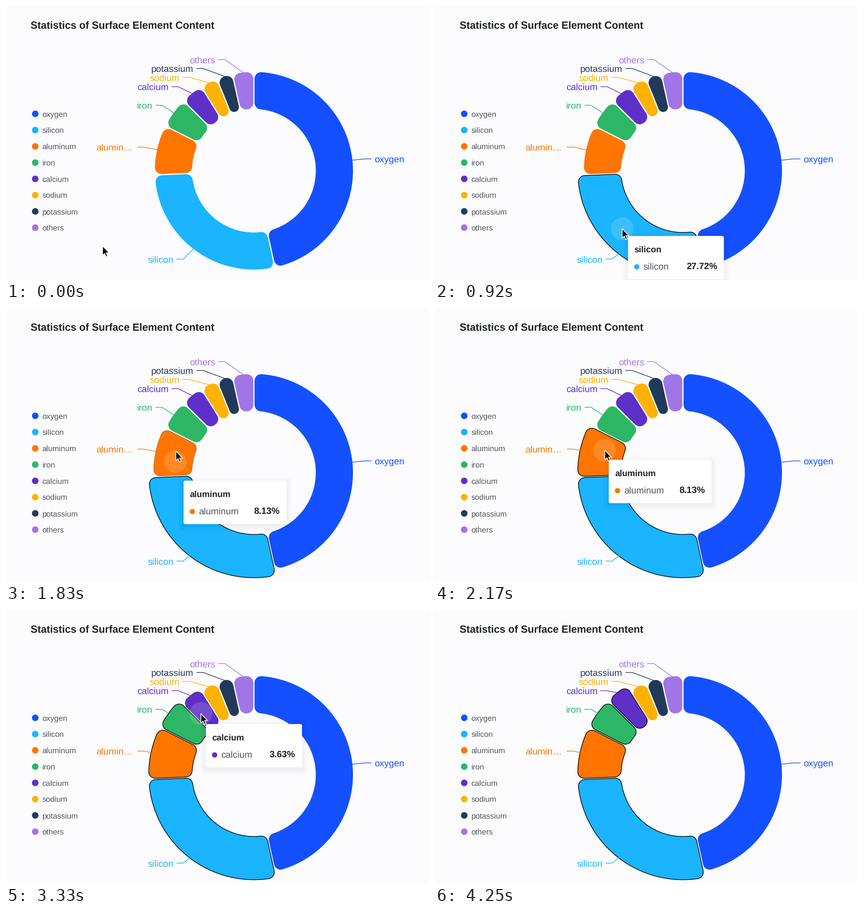
Recreate the animation shown at these times as a matplotlib script. Size 929x603 px, loop 4760 ms.

```python
import matplotlib.pyplot as plt
import numpy as np
from matplotlib.animation import FuncAnimation
from matplotlib.patches import Circle, FancyBboxPatch, Polygon

W, H, DPI = 929, 603, 64
LOOP, TICK = 4760, 20
CX, CY = 544.5, 362.5
R_IN, R_OUT, R_HOVER = 135.9, 217.5, 231.1
CORNER, PAD = 14.5, 1.34
GROW_STEPS = 3.6
BG, INK, GREY = "#fcfcfe", "#1d2129", "#50555f"

# name, share, colour, label text, text x, elbow x, line end x, line y
ITEMS = [
    ("oxygen", 46.60, "#1450ff", "oxygen", 809, 788, 802, 336.5),
    ("silicon", 27.72, "#1bb4ff", "silicon", 368, 389, 375, 557),
    ("aluminum", 8.13, "#ff7500", "alumin…", 279, 304, 290, 310.5),
    ("iron", 5.00, "#2db765", "iron", 322, 343, 329, 218.5),
    ("calcium", 3.63, "#5e30c8", "calcium", 357, 378, 364, 177.5),
    ("sodium", 2.83, "#ffb200", "sodium", 381, 402, 388, 157),
    ("potassium", 2.59, "#213a5a", "potassium", 412, 433, 419, 137.5),
    ("others", 3.50, "#a076e6", "others", 460, 481, 467, 118),
]

# slice index: (step when hover begins, tooltip width, value)
HOVERS = {
    1: (6.9, 210.5, "27.72%"),
    2: (21.2, 226, "8.13%"),
    3: (29.2, 148.5, "5%"),
    4: (38.55, 211, "3.63%"),
}
TIP_END = 45

# step, x, y
POINTER = np.array([
    (4, 212, 528), (5, 262, 520), (6, 370, 500), (7, 408, 491), (8, 411, 490),
    (13, 411, 490), (14, 409, 490), (17, 409, 490), (18, 389, 413),
    (19, 378, 400), (20, 372, 384), (21, 371, 348), (22, 373, 315),
    (23, 371, 314), (26, 373, 313), (28.5, 393, 288), (30, 400, 272),
    (31, 401, 271), (35, 401, 271), (36, 406, 263), (37.85, 420, 238),
    (39, 428, 228),
])
TIP = np.array([
    (7, 523, 334), (8, 454, 449), (9, 429, 498), (10, 424, 506), (18, 424, 506),
    (19, 418, 490), (20, 407, 450), (21, 398, 412), (22, 390, 380),
    (23, 383, 345), (24, 381, 336), (27, 382, 333), (29, 387, 322),
    (30, 404, 301), (31, 411, 291), (36, 411, 291), (37, 413, 288),
    (38, 421, 278), (39, 431, 264), (40, 439, 251), (41, 441, 249),
])
ARROW = 1.27 * np.array([
    (0, 0), (0, 16.4), (3.7, 13), (6.2, 18.8), (8.9, 17.6), (6.4, 12), (11.6, 12),
])


def px(size):
    return size * 72 / DPI


def along(keys, step):
    return np.array([np.interp(step, keys[:, 0], keys[:, i]) for i in (1, 2)])


def polar(angle, radius, origin=(CX, CY)):
    return np.column_stack((origin[0] + radius * np.sin(angle),
                            origin[1] - radius * np.cos(angle)))


def slice_points(a0, a1, r_out):
    """Ring sector with parallel gaps and rounded corners."""
    s = np.sin(min((a1 - a0) / 2, np.pi / 2))
    c_out = min(CORNER, (r_out * s - PAD) / (1 + s))
    c_in = min(CORNER, (R_IN * s - PAD) / max(1 - s, 1e-6))
    d_out, d_in = r_out - c_out, R_IN + c_in
    t_out = np.arcsin((PAD + c_out) / d_out)
    t_in = np.arcsin((PAD + c_in) / d_in)
    q = np.pi / 2

    def corner(angle, dist, radius, start, end):
        center = polar(np.array([angle]), dist)[0]
        return polar(np.linspace(start, end, 14), radius, center)

    def arc(start, end, radius):
        n = 3 + int(abs(end - start) * 45)
        return polar(np.linspace(start, end, n), radius)

    b0, b1, e0, e1 = a0 + t_out, a1 - t_out, a0 + t_in, a1 - t_in
    return np.vstack((
        corner(b0, d_out, c_out, a0 - q, b0),
        arc(b0, b1, r_out),
        corner(b1, d_out, c_out, b1, a1 + q),
        corner(e1, d_in, c_in, a1 + q, e1 + 2 * q),
        arc(e1, e0, R_IN),
        corner(e0, d_in, c_in, e0 + 2 * q, a0 + 3 * q),
    ))


plt.rcParams["font.family"] = ["Liberation Sans", "DejaVu Sans"]
plt.rcParams["text.hinting"] = "none"
fig = plt.figure(figsize=(W / DPI, H / DPI), dpi=DPI, facecolor=BG)
ax = fig.add_axes([0, 0, 1, 1])
ax.set_xlim(0, W)
ax.set_ylim(H, 0)
ax.axis("off")


def write(x, y, text, size, color, z=4, **kw):
    return ax.text(x, y, text, fontsize=px(size), color=color, va="baseline",
                   zorder=z, **kw)


def add(patch):
    return ax.add_patch(patch)


write(54, 49.3, "Statistics of Surface Element Content", 22.65, INK, weight="bold")

edges = np.cumsum([0] + [item[1] for item in ITEMS]) * 2 * np.pi / 100
slices, leaders = [], []
for i, (name, _, color, label, tx, elbow, end, ly) in enumerate(ITEMS):
    y = 237.3 + 35.78 * i
    add(Circle((64.2, y), 7.2, color=color, lw=0))
    write(79.5, y + 6, name, 17.2, GREY)
    slices.append(add(Polygon(slice_points(edges[i], edges[i + 1], R_OUT),
                              fc=color, ec="none", lw=0, zorder=2,
                              joinstyle="round")))
    leaders.append(ax.plot([0, elbow, end], [0, ly, ly], color=color,
                           lw=px(1.45), zorder=3)[0])
    write(tx, ly + 7.3, label, 20.4, color, ha="left" if i == 0 else "right")

halo = add(Circle((0, 0), 25, color="white", lw=0, alpha=0.15, zorder=5))


def rounded(z, **kw):
    style = "round,pad=0,rounding_size=4"
    return add(FancyBboxPatch((0, 0), 10, 10, boxstyle=style, lw=0, zorder=z, **kw))


SPREAD = range(-2, 13, 2)
shadows = [rounded(6, fc="black", alpha=0.009) for _ in SPREAD]
box = rounded(7, fc="white")
dot = add(Circle((0, 0), 5.8, lw=0, zorder=8))
title = write(0, 0, "", 19, INK, 8, weight="bold")
key = write(0, 0, "", 20.3, GREY, 8)
value = write(0, 0, "", 20, INK, 8, weight="bold", ha="right")
tip_parts = [*shadows, box, dot, title, key, value]
arrow = add(Polygon(ARROW, fc="black", ec="white", lw=px(1.6), zorder=10))


def draw_tip(step):
    active = [i for i, hover in HOVERS.items() if hover[0] <= step]
    shown = bool(active) and step < TIP_END
    for part in tip_parts:
        part.set_visible(shown)
    if not shown:
        return
    i = active[-1]
    _, width, share = HOVERS[i]
    x, y = along(TIP, step)
    for shadow, e in zip(shadows, SPREAD):
        shadow.set_bounds(x - e, y - e + 4, width + 2 * e, 95 + 2 * e)
    box.set_bounds(x, y, width, 95.5)
    dot.set_center((x + 19.2, y + 68))
    dot.set_facecolor(ITEMS[i][2])
    title.set_text(ITEMS[i][0])
    title.set_position((x + 13.3, y + 36))
    key.set_text(ITEMS[i][0])
    key.set_position((x + 33, y + 74))
    value.set_text(share)
    value.set_position((x + width - 14.5, y + 74))


def update(frame):
    # the picture advances twelve times a second
    step = (frame * TICK + TICK // 2 + 4) * 12 // 1000
    for i, leader in enumerate(leaders):
        grow = 0
        if i in HOVERS:
            grow = np.clip((step - HOVERS[i][0]) / GROW_STEPS, 0, 1)
            slices[i].set_xy(slice_points(edges[i], edges[i + 1],
                                          R_OUT + grow * (R_HOVER - R_OUT)))
            slices[i].set_linewidth(px(1.45 * grow))
            slices[i].set_edgecolor("black" if grow else "none")
        radius = R_OUT + grow * (R_HOVER - R_OUT)
        start = polar(np.array([(edges[i] + edges[i + 1]) / 2]), radius)[0]
        _, _, _, _, _, elbow, end, ly = ITEMS[i]
        leader.set_data([start[0], elbow, end], [start[1], ly, ly])
    draw_tip(step)
    fade = np.clip((47 - step) / 3, 0, 1)
    halo.set_center(along(POINTER, step - 0.7))
    halo.set_alpha(0.15 * fade)
    arrow.set_xy(ARROW + along(POINTER, step))
    arrow.set_alpha(fade)
    return []


anim = FuncAnimation(fig, update, frames=LOOP // TICK, interval=TICK,
                     init_func=lambda: update(0), repeat=True, repeat_delay=0)
plt.show()
```
